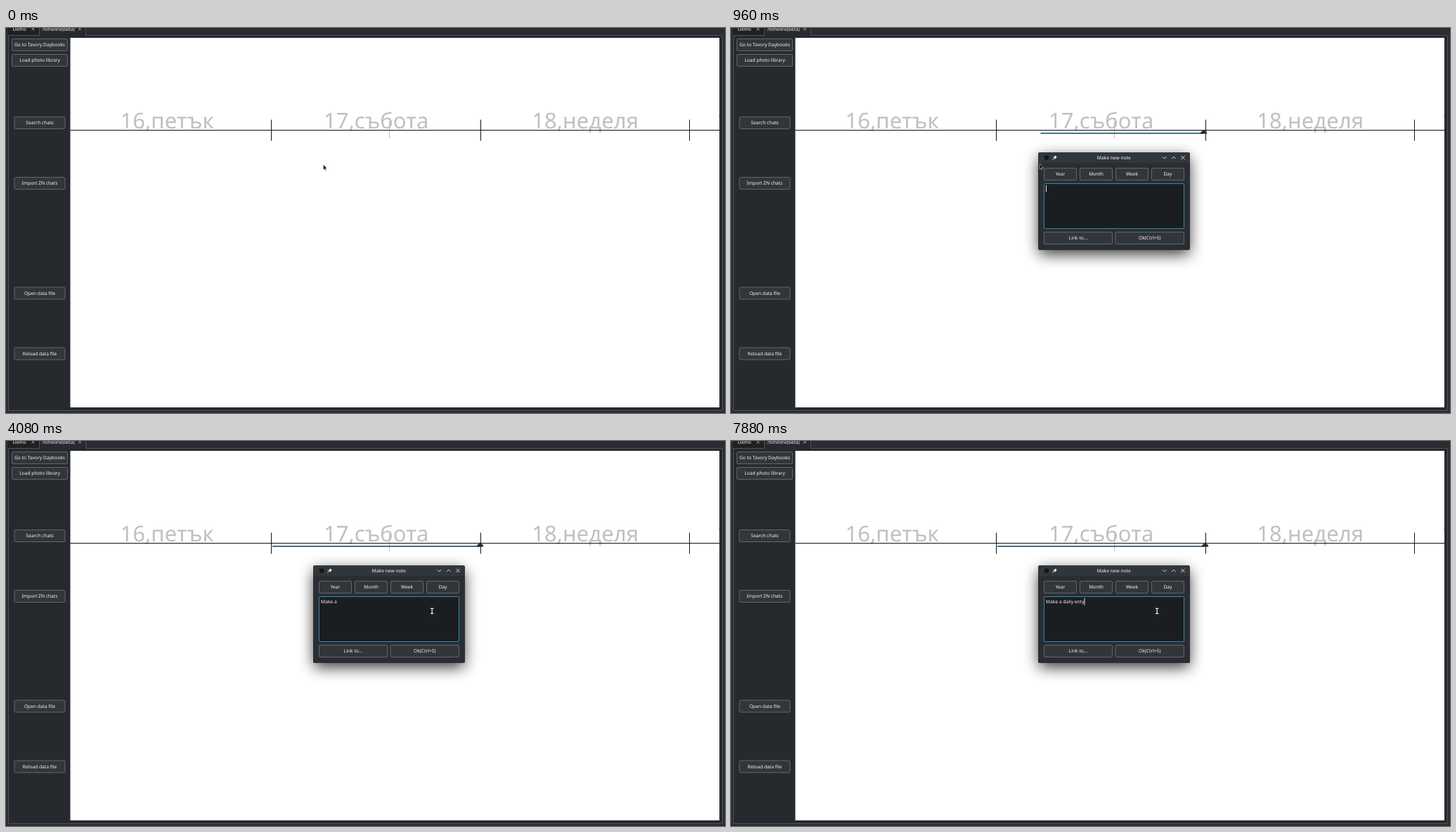
Write an HTML page that moves like this. It is 1023 px wide and 548 px high and loops after 8 s.

```html
<!DOCTYPE html>
<html lang="en">
<head>
<meta charset="utf-8">
<title>Make new note</title>
<style>
  html, body { margin: 0; width: 100%; height: 100%; overflow: hidden; background: #2a2e32; }
  svg { display: block; width: 1023px; height: 548px; }
  text { font-family: "Noto Sans", "Open Sans", sans-serif; font-size: 6.68px; fill: #f4f5f5; text-rendering: geometricPrecision; white-space: pre; }
  .mid { text-anchor: middle; }
  .day { font-size: 31px; fill: #c0c0c0; }
  .button rect { fill: #31363b; stroke: #62676b; }
  .button.focus rect { stroke: #3a8cc4; }
  .button.down rect { fill: #2f5f7d; }
  .axis { stroke: #111; fill: none; }
  .pane { stroke: #4e5256; fill: none; }
  .icon { stroke: #eceded; fill: none; stroke-width: .9; }
  #editor { fill: #1b1e20; stroke: #5a5f63; }
  #editor.focus { stroke: #2f88b8; }
</style>
</head>
<body>
<svg viewBox="0 0 1023 548">
  <defs>
    <clipPath id="sheet"><rect x="91.5" y="14" width="923.5" height="526"/></clipPath>
    <filter id="blur" x="-30%" y="-40%" width="160%" height="190%"><feGaussianBlur stdDeviation="10.5"/></filter>
  </defs>

  <rect width="1023" height="548" fill="#2a2e32"/>
  <rect x="3" y="10" width="1017" height="535" fill="#26292e"/>
  <rect x="3" width="44" height="10" fill="#1e2124"/>
  <path class="pane" d="M47.5 0V10.5H3.5V544.5H1019.5V10.5H113.5V0"/>
  <rect x="48" width="65" height="11" fill="#26292e"/>
  <text x="9.8" y="3.9">Demo</text>
  <text x="51.8" y="3.9">/timeline(beta)</text>
  <path class="icon" stroke-opacity=".7" d="M36.5-.5l4 4m0-4l-4 4M103-.5l4 4m0-4l-4 4"/>
  <g id="side"></g>

  <rect x="91.5" y="14" width="923.5" height="526" fill="#fff"/>
  <g clip-path="url(#sheet)">
    <g id="days"></g>
    <text class="day" x="1010.5" y="143">19,понеделник</text>
    <path d="M545.5 133V157" stroke="#a3cfa3"/>
    <path class="axis" d="M91 145.5H1015M377.5 130.5V160.5M675.5 130.5V160.5M972.5 130.5V160.5"/>
    <g id="span">
      <path id="bar" stroke-width="1.7"/>
      <path id="knob" d="M-4.7 0a4.7 4.3 0 0 1 9.4 0z" fill="#26292c"/>
    </g>
  </g>

  <g id="dialog">
    <rect x="438" y="184" width="214" height="138" rx="3" fill="#000" opacity=".78" filter="url(#blur)"/>
    <path d="M437 316V180a3 3 0 0 1 3-3H650a3 3 0 0 1 3 3V314a2 2 0 0 1-2 2H439a2 2 0 0 1-2-2z" fill="#2a2e32"/>
    <path d="M437 192V180a3 3 0 0 1 3-3H650a3 3 0 0 1 3 3V192z" fill="#31363b"/>
    <rect x="446" y="181.5" width="6" height="6" fill="#141618"/>
    <path d="M457.3 187.7l2.2-2.3M458.2 183.6l3.2 3.2" class="icon"/>
    <path d="M459.3 183.9l2.2-2.3 2.2 2.2-2.3 2.2z" fill="#f4f5f5"/>
    <text class="mid" x="544.8" y="187">Make new note</text>
    <path class="icon" d="M613.8 183.2l2.8 2.8 2.8-2.8M627 186l2.8-2.8 2.8 2.8M640.4 181.9l5.2 5.2m0-5.2l-5.2 5.2"/>
    <g id="controls"></g>
    <rect id="editor" x="445.5" y="221.5" width="199" height="64" rx="1.5"/>
    <text id="note" x="448.1" y="231.3"></text>
    <path id="caret" stroke="#fcfcfc" stroke-width=".9"/>
  </g>

  <path id="arrow" d="M0 0V7.6L1.7 6.1 2.9 8.7 4.1 8.1 3 5.6H5.2z" fill="#000" stroke="#fff" stroke-width=".5"/>
  <g id="beam" fill="none">
    <path d="M-2.2-3.7H2.2M-2.2 3.7H2.2M0-3.7V3.7" stroke="#e8e8e8" stroke-width="1.3"/>
  </g>
</svg>
<script>
const NS = 'http://www.w3.org/2000/svg';
const $ = id => document.getElementById(id);

function add(parent, tag, attrs, label) {
  const el = document.createElementNS(NS, tag);
  for (const key in attrs) el.setAttribute(key, attrs[key]);
  if (label) el.textContent = label;
  return parent.appendChild(el);
}

function button(parent, label, x, y, width, height = 17) {
  const g = add(parent, 'g', { class: 'button' });
  add(g, 'rect', { x, y, width, height, rx: 1.5 });
  add(g, 'text', { class: 'mid', x: x + width / 2, y: y + height / 2 + 2.4 }, label);
  return g;
}

button($('side'), 'Go to Tavory Daybooks', 8.5, 15.5, 79);
button($('side'), 'Load photo library', 8.5, 37.5, 79);
[['Search chats', 126.5], ['Import ZN chats', 212.5], ['Open data file', 369], ['Reload data file', 455]]
  .forEach(([label, y]) => button($('side'), label, 12, y, 72));

['16,петък', '17,събота', '18,неделя'].forEach((label, i) =>
  add($('days'), 'text', { class: 'day mid', x: 229.2 + i * 297.5, y: 143 }, label));

const [, , , dayButton] = ['Year', 'Month', 'Week', 'Day'].map((label, i) =>
  button($('controls'), label, 445.5 + i * 51, 199.5, 46));
button($('controls'), 'Link to...', 445.5, 290.5, 97);
button($('controls'), 'Ok(Ctrl+S)', 547, 290.5, 97.5);

// Typed text by time in ms
const typing = [
  [0, ''], [3500, 'M'], [3590, 'Ma'], [3690, 'Mak'], [3790, 'Make'], [3880, 'Make '],
  [4080, 'Make a'], [4330, 'Make a '], [4540, 'Make a d'], [4670, 'Make a da'],
  [5880, 'Make a dai'], [6000, 'Make a dail'], [6250, 'Make a dailt'], [6330, 'Make a dailty'],
  [6540, 'Make a dailt'], [6630, 'Make a dail'], [6830, 'Make a daily'], [7080, 'Make a daily '],
  [7460, 'Make a daily e'], [7540, 'Make a daily en'], [7630, 'Make a daily ent'], [7880, 'Make a daily enty']
];
const caretOff = [[1420, 1920], [2130, 2670], [3170, 3500], [4080, 4330], [5080, 5540]];

const inside = (t, [from, to]) => t >= from && t < to;
const show = (el, on) => el.setAttribute('visibility', on ? 'visible' : 'hidden');
const move = (el, x, y) => el.setAttribute('transform', `translate(${x} ${y})`);

// Progress 0..1 in n hard steps, the first at `from`, the last at `to`
const steps = (t, from, to, n) =>
  t < from ? 0 : Math.min(n, 1 + Math.floor((t - from) / (to - from) * (n - 1) + 1e-6)) / n;
const bend = (a, b, c, k) => a * (1 - k) ** 2 + 2 * b * k * (1 - k) + c * k * k;

function pointer(t) {
  if (t < 130) return [451.5, 194.3];
  if (t < 920) {
    const k = steps(t, 460, 710, 5);
    return [461 - 21.7 * k, 198 - 4.9 * k];
  }
  if (t < 2540) {
    const k = 1 - (1 - steps(t, 1290, 2040, 9)) ** 1.5;
    return [bend(439.3, 560, 613, k), bend(193.1, 284, 208, k)];
  }
  return t < 2670 ? [613.2, 233.2] : [606.2, 242];
}

function draw(t) {
  const [x, y] = pointer(t);
  const open = t >= 920;
  const overText = open && x > 445 && x < 645 && y > 221 && y < 286;
  move($('arrow'), x, y);
  move($('beam'), x, y);
  show($('arrow'), !overText);
  show($('beam'), overText);

  const wholeDay = t >= 2300;
  show($('span'), open);
  $('bar').setAttribute('d', wholeDay ? 'M379 149.8H674' : 'M440.5 149.8H672');
  $('bar').setAttribute('stroke', t < 960 ? '#3daee9' : wholeDay ? '#35596d' : '#2f6478');
  move($('knob'), wholeDay ? 674.6 : 672.6, 150.4);

  const dialog = $('dialog');
  const opening = t < 960;
  dialog.style.display = open ? '' : 'none';
  dialog.setAttribute('opacity', opening ? .41 : 1);
  dialog.setAttribute('transform', opening ? 'translate(545 246.2) scale(.97) translate(-545 -246.5)' : '');

  const dayFocus = inside(t, [2130, 2670]);
  dayButton.classList.toggle('focus', dayFocus);
  dayButton.classList.toggle('down', inside(t, [2210, 2380]));
  $('editor').classList.toggle('focus', !dayFocus);

  const value = typing.filter(([at]) => at <= t).pop()[1];
  const note = $('note');
  if (note.textContent !== value) note.textContent = value;
  const end = 448.5 + (value && open ? note.getComputedTextLength() : 0);
  $('caret').setAttribute('d', `M${end} 223.7V233.7`);
  show($('caret'), open && !caretOff.some(range => inside(t, range)));
}

const start = performance.now();
function tick() {
  draw((performance.now() - start) % 8000);
  requestAnimationFrame(tick);
}
tick();
</script>
</body>
</html>
```
